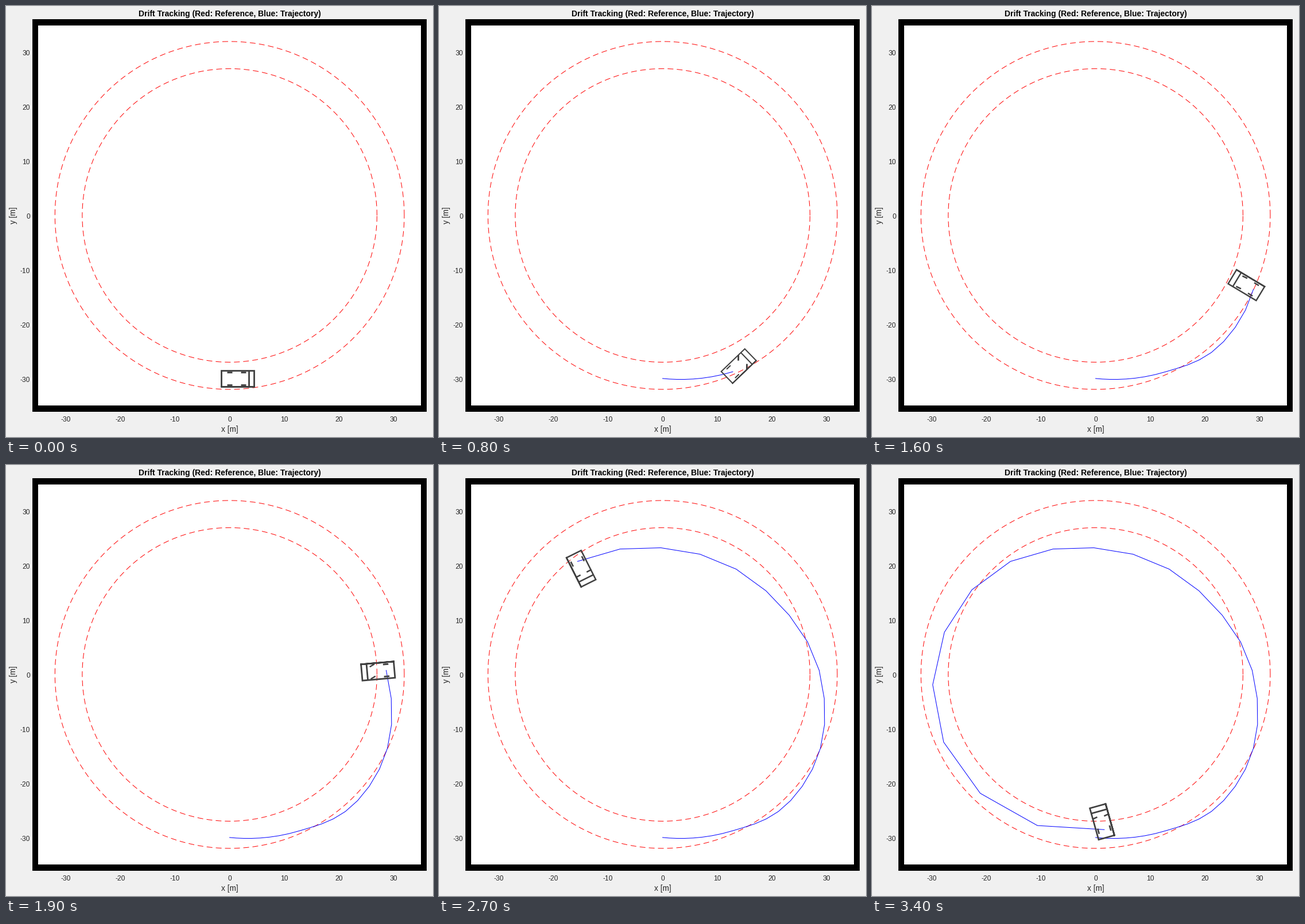
A matplotlib script that plays this animation: 744 by 752 pixels, repeating every 3.5 s.

```python
import numpy as np
import matplotlib.pyplot as plt
from matplotlib.animation import FuncAnimation
from matplotlib.patches import Rectangle

plt.rcParams["font.family"] = "Liberation Sans"

W, H, DPI = 744, 752, 100
PT = 72 / DPI  # points per pixel
FRAMES, INTERVAL = 35, 100
CX, CY = 389.1, 364.9  # stage position of the world origin
SX, SY = 9.51, 9.484  # pixels per metre
GREY, INK = "#404040", "#262626"

# Key poses: orbit angle and radius of the rear axle, yaw and steering
KEYS = [0, 8, 13, 16, 19, 22, 25, 28, 31, 34]
ANGLE = [-90, -65.9, -44.7, -25.2, 1.5, 39.1, 90.8, 145.5, 204.1, 273.2]
RADIUS = [30, 31.5, 33, 31.95, 28.7, 24.4, 23.3, 27.5, 30.5, 28.6]
YAW = [0, 44, 112, 149, 185, 221, 261.5, 316.5, 386, 465.6]
STEER = [0, 45, 3, 5, 26, 90, 95, 90, 95, 99]


def smooth(t, values):
    """Cubic Hermite curve through the key values."""
    k, v = np.array(KEYS, float), np.array(values, float)
    slope = np.gradient(v, k, edge_order=2)
    i = np.clip(np.searchsorted(k, t, "right") - 1, 0, len(k) - 2)
    h = k[i + 1] - k[i]
    s = (t - k[i]) / h
    return (v[i] + (v[i + 1] - v[i]) * s * s * (3 - 2 * s)
            + h * s * (1 - s) * (slope[i] * (1 - s) - slope[i + 1] * s))


def polar(r, a):
    return np.column_stack([r * np.cos(a), r * np.sin(a)])


def turn(pts, a):
    c, s = np.cos(a), np.sin(a)
    return np.asarray(pts) @ np.array([(c, s), (-s, c)])


steps = np.arange(FRAMES)
path = polar(smooth(steps, RADIUS), np.radians(smooth(steps, ANGLE)))
yaws = np.radians(smooth(steps, YAW))
steers = np.radians(smooth(steps, STEER))

fig = plt.figure(figsize=(W / DPI, H / DPI), dpi=DPI, facecolor="#f0f0f0")
ax = fig.add_axes([0, 0, 1, 1])
ax.set_xlim(-0.5, W - 0.5)
ax.set_ylim(H - 0.5, -0.5)
ax.axis("off")


def box(x0, y0, x1, y1, color):
    ax.add_patch(Rectangle((x0 - 0.5, y0 - 0.5), x1 - x0, y1 - y0,
                           fc=color, ec="none", zorder=0))


def label(x, y, text, px, ha="center", **kw):
    kw.setdefault("color", INK)
    ax.text(x, y, text, fontsize=px * PT, ha=ha, va="baseline",
            rotation_mode="anchor", **kw)


def stroke(color, width, **kw):
    return ax.plot([], [], color=color, lw=width * PT, **kw)[0]


def trace(line, pts):
    line.set_data(CX + SX * pts[:, 0], CY - SY * pts[:, 1])


box(46, 23, 733, 708, "black")
box(56, 34, 723, 697, "white")

label(389, 17.5, "Drift Tracking (Red: Reference, Blue: Trajectory)", 13.95,
      weight="bold", color="black")
label(389, 742.5, "x [m]", 13.8)
label(17, 365, "y [m]", 13.8, rotation=90)
for v in range(-30, 31, 10):
    label(CX + SX * v, 724.5, str(v), 12)
    label(41.5, 370.5 - 9.5 * v, str(v), 12, ha="right")

theta = np.linspace(0, 2 * np.pi, 361)
for r in (27, 32):
    trace(stroke("red", 1, dashes=(10, 6), dash_capstyle="butt"),
          polar(r, theta))

trail = stroke("blue", 1)
body = stroke(GREY, 3, solid_joinstyle="miter")
hood = stroke(GREY, 3, solid_capstyle="butt")
wheels = [stroke(GREY, 3, solid_capstyle="butt") for _ in range(4)]
HUBS = [(x, y) for x in (0, 2.5) for y in (1.12, -1.12)]

BODY = [(-1.5, -1.5), (4.5, -1.5), (4.5, 1.5), (-1.5, 1.5),
        (-1.5, -1.5), (4.5, -1.5)]
HOOD = [(3.5, -1.5), (3.5, 1.5)]
WHEEL = [(-0.5, 0), (0.5, 0)]


def place(line, pts, angle):
    """Slanted strokes come out thinner."""
    trace(line, pts)
    line.set_linewidth(2.8 * PT * max(abs(np.cos(angle)), abs(np.sin(angle))))


def update(i):
    pos, yaw = path[i], yaws[i]
    trace(trail, path[:i + 1])
    place(body, pos + turn(BODY, yaw), yaw)
    place(hood, pos + turn(HOOD, yaw), yaw)
    for line, hub in zip(wheels, HUBS):
        a = yaw + (steers[i] if hub[0] else 0)
        place(line, pos + turn(hub, yaw) + turn(WHEEL, a), a)
    return [trail, body, hood, *wheels]


anim = FuncAnimation(fig, update, frames=FRAMES, interval=INTERVAL,
                     repeat=True, repeat_delay=0)
plt.show()
```
